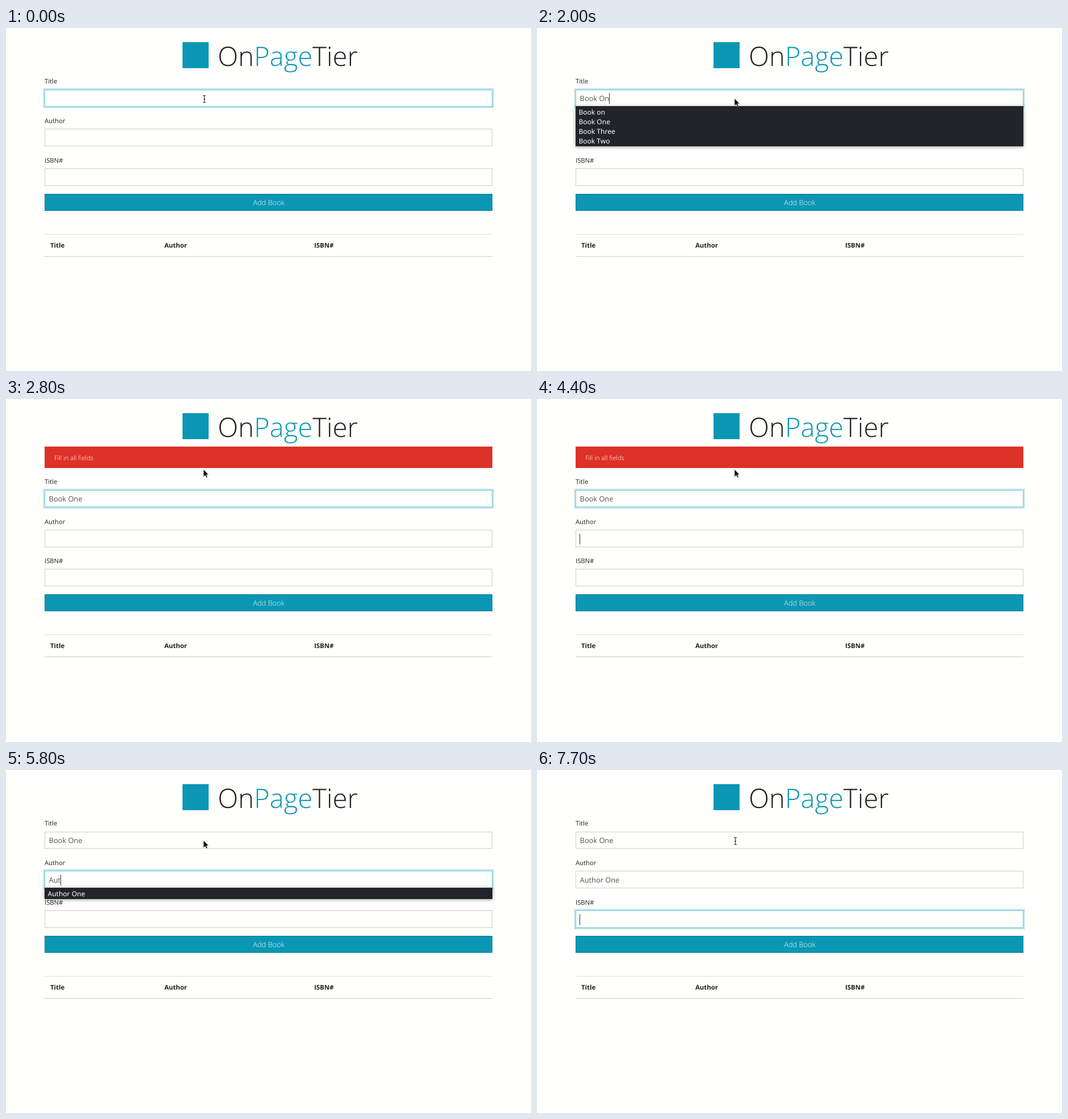
Recreate the animation shown at these times as an HTML page. Size 925x606 px, loop 8 s.

```html
<!DOCTYPE html>
<html lang="en">
<head>
<meta charset="utf-8">
<title>Book list form</title>
<style>
  html, body { margin: 0; width: 100%; height: 100%; overflow: hidden; background: #fffffc; }
  svg { display: block; }
  text { font: 11.25px "Open Sans", sans-serif; fill: #222; text-rendering: geometricPrecision; white-space: pre; }
  .brand { font-size: 47.2px; font-weight: 300; }
  .brand tspan, .logo { fill: #0b97b4; }
  .field { fill: #fffffc; stroke: #ccc; }
  .ring { fill: none; stroke: #bce3eb; stroke-width: 2.5; }
  .focus { fill: none; stroke: #74cbdb; }
  .value { font-size: 12.8px; fill: #50555a; }
  .caret { fill: #333; }
  .button { fill: #0b97b4; stroke: #087c95; }
  .action { font-size: 12.8px; font-weight: 300; fill: #e9f7fa; text-anchor: middle; }
  .head { font-size: 11.4px; font-weight: 700; }
  .alert { fill: #de3127; stroke: #d9432f; }
  .notice { font-weight: 300; fill: #fff; }
  .popup { fill: #212529; filter: drop-shadow(0 1px 3px rgba(0, 0, 0, .4)); }
  .option { font: 12px "Noto Sans", sans-serif; fill: #fff; }
</style>
</head>
<body>
<svg id="stage" width="925" height="606" viewBox="0 0 925 606">
  <rect class="logo" x="311" y="25" width="46" height="46"/>
  <text class="brand" x="373" y="67">On<tspan>Page</tspan>Tier</text>
  <g id="alert">
    <rect class="alert" x="68.5" y="84.5" width="788" height="37"/>
    <text class="notice" x="85" y="107.8">Fill in all fields</text>
  </g>
  <g id="form"></g>
  <g id="lower">
    <rect class="button" x="68.5" y="293.5" width="788" height="29"/>
    <text class="action" x="463" y="313">Add Book</text>
    <path d="M68 364.5H857" stroke="#dcdfe1"/>
    <path d="M68 403.5H857" stroke="#c9cdcf"/>
    <text class="head" x="78" y="388">Title</text>
    <text class="head" x="279" y="388">Author</text>
    <text class="head" x="543" y="388">ISBN#</text>
  </g>
  <g id="popup"></g>
  <path id="arrow" d="M348 124.5V137.5L351 134.8L353 138.8L355 137.8L353 133.8H357Z" fill="#111" stroke="#ddd" stroke-width=".6"/>
  <path id="beam" d="M347 119.5H352M349.5 120V131M347 131.5H352M348 125.5H351" fill="none" stroke="#222"/>
</svg>
<script>
const LOOP = 8000, LEFT = 68, WIDTH = 789, ALERT_SHIFT = 52;
const $ = id => document.getElementById(id);

function add(parent, tag, attrs, content = "") {
  const el = document.createElementNS("http://www.w3.org/2000/svg", tag);
  for (const key in attrs) el.setAttribute(key, attrs[key]);
  el.textContent = content;
  parent.append(el);
  return el;
}

const show = (el, on) => { el.style.display = on ? "" : "none"; };
const within = (t, from, to) => t >= from && t < to;

function makeField(label, top, bottom, shift) {
  const group = add($("form"), "g", {});
  const outline = (cls, out) => add(group, "rect", {
    class: cls, x: LEFT - out, y: top - out, width: WIDTH + 2 * out, height: bottom - top + 2 * out
  });
  add(group, "text", { x: LEFT, y: bottom - 41 }, label);
  outline("field", -.5);
  const ring = outline("ring", 1.25), focus = outline("focus", -.5);
  const value = add(group, "text", { class: "value", x: 75.6, y: bottom - 10 });
  const caret = add(group, "rect", { class: "caret", y: bottom - 24, width: 1, height: 19 });
  return { group, ring, focus, value, caret, shift };
}

const fields = [
  makeField("Title", 109, 139, 52),
  makeField("Author", 178, 209, 53),
  makeField("ISBN#", 248, 279, 52)
];

// Each time adds one more letter
const typing = [
  ["Book One", [900, 1200, 1400, 1600, 1700, 1800, 2000, 2100]],
  ["Author One", [5400, 5700, 5800, 5900, 6000, 6100, 6400, 7000, 7200, 7300]],
  ["", []]
];
const carets = [[[900, 2800], [3500, 4400]], [[4400, 7600]], [[7600, LOOP]]];

const popups = [
  { from: 1100, to: 2300, top: 138, items: ["Book on", "Book One", "Book Three", "Book Two"] },
  { from: 5400, to: 5700, top: 208, items: ["Action", "Adventure", "Anthology", "Article", "Atlas", "Author One"] },
  { from: 5700, to: 7500, top: 208, items: ["Author One"] }
];
for (const p of popups) {
  p.el = add($("popup"), "g", {});
  add(p.el, "rect", { class: "popup", x: LEFT, y: p.top, width: WIDTH, height: p.items.length * 17 + 3 });
  p.items.forEach((item, i) =>
    add(p.el, "text", { class: "option", x: 73.5, y: p.top + 15.3 + i * 17 }, item));
}

function fade(t, start) {
  const x = Math.min(1, Math.max(0, (t - start) / 150));
  return x * x * (3 - 2 * x);
}

function draw(t) {
  const failed = within(t, 2800, 4900);
  const toAuthor = fade(t, 4400), toIsbn = fade(t, 7550);
  const focus = [1 - toAuthor, toAuthor - toIsbn, toIsbn];

  fields.forEach((f, i) => {
    const [word, times] = typing[i];
    const text = word.slice(0, times.filter(at => t >= at).length);
    if (f.value.textContent !== text) f.value.textContent = text;
    f.group.setAttribute("transform", `translate(0 ${failed ? f.shift : 0})`);
    f.ring.style.opacity = f.focus.style.opacity = focus[i];
    const on = carets[i].some(([from, to]) => within(t, from, to));
    show(f.caret, on);
    if (on) f.caret.setAttribute("x", Math.round(75.4 + (text ? f.value.getComputedTextLength() : 0)));
  });

  let open = false;
  for (const p of popups) {
    const on = within(t, p.from, p.to);
    show(p.el, on);
    open = open || on;
  }
  show($("alert"), failed);
  $("lower").setAttribute("transform", `translate(0 ${failed ? ALERT_SHIFT : 0})`);
  show($("arrow"), open || failed);
  show($("beam"), !open && !failed);
}

const start = performance.now();
function tick() {
  draw((performance.now() - start) % LOOP);
  requestAnimationFrame(tick);
}
tick();
</script>
</body>
</html>
```
